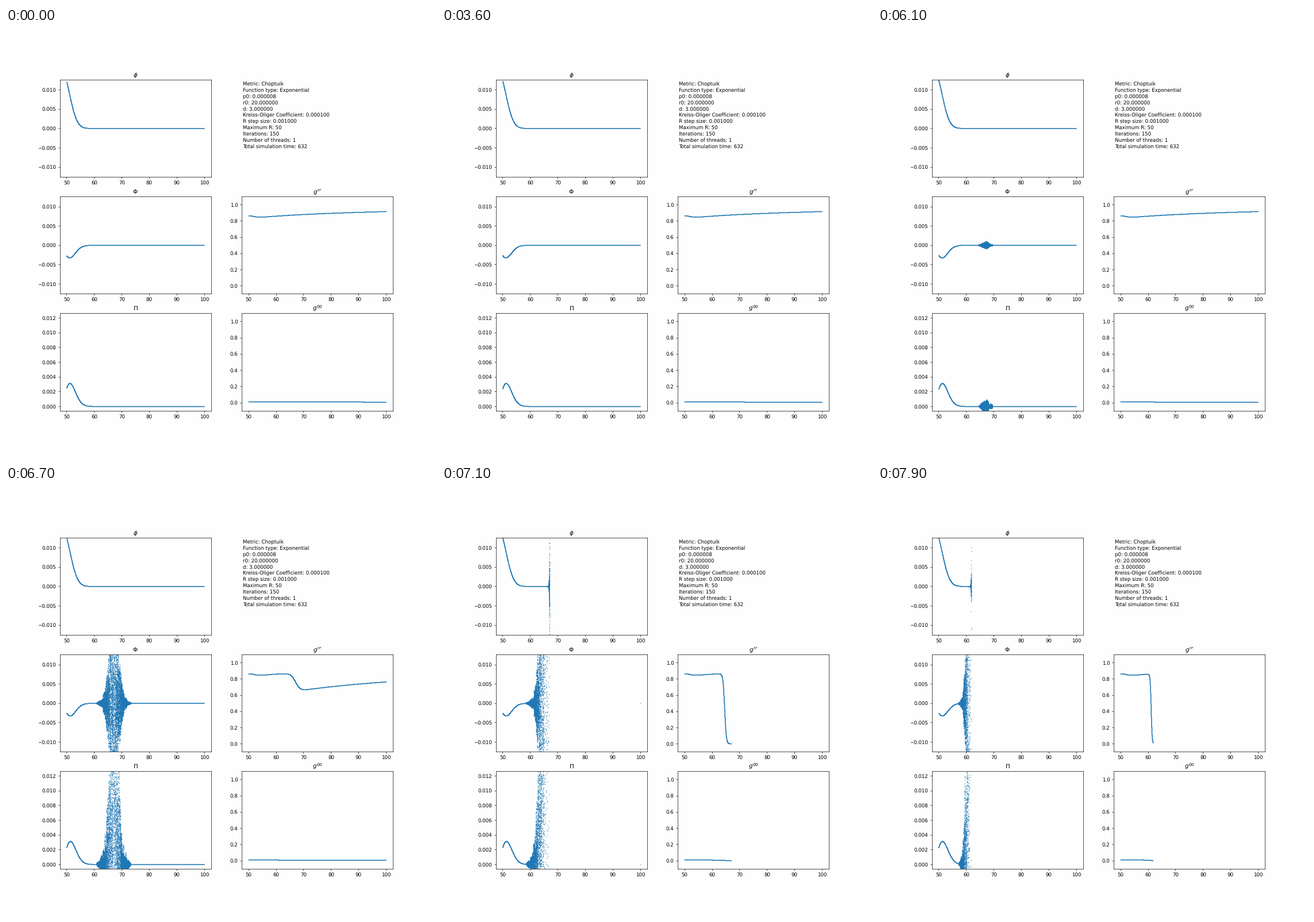
Write a matplotlib script that moves like this. It is 748 px wide and 748 px high and loops after 8 s.

```python
import numpy as np
import matplotlib.pyplot as plt
from matplotlib.animation import FuncAnimation

SIZE, INCHES = 748, 12
FRAMES, STEP = 80, 100
GRID = 1200 / SIZE          # curve points sit on a finer pixel grid
COLLAPSE = 6.95             # seconds
BLUE, PAPER = "C0", "#fefefe"

INFO = """Metric: Choptuik
Function type: Exponential
p0: 0.000008
r0: 20.000000
d: 3.000000
Kreiss-Oliger Coefficient: 0.000100
R step size: 0.001000
Maximum R: 50
Iterations: 150
Number of threads: 1
Total simulation time: 632"""

plt.rcParams["font.family"] = "DejaVu Sans"
plt.rcParams["text.hinting"] = "none"
plt.rcParams["axes.facecolor"] = PAPER
fig = plt.figure(figsize=(INCHES, INCHES), dpi=SIZE / INCHES, facecolor=PAPER)

r = np.linspace(50, 100, 4001)
fine = np.arange(56, 78, 0.001)


class Panel:
    def __init__(self, slot, title, ylim, yticks):
        self.ax = ax = fig.add_subplot(3, 2, slot)
        ax.set_title(title)
        ax.set_xlim(47.5, 102.5)
        ax.set_ylim(*ylim)
        ax.set_xticks(range(50, 101, 10))
        ax.set_yticks(yticks)
        self.ylim = ylim
        self.line, = ax.plot([], [], color=BLUE, lw=1.85, snap=False,
                             solid_capstyle="butt", solid_joinstyle="round")
        self.dots = ax.scatter([], [], s=2.25, color=BLUE, edgecolors="none")

    def snap(self, x, y):
        """Move points to the centres of the fine pixel grid."""
        to_px = self.ax.transData
        px = to_px.transform(np.column_stack([x, y])) * GRID
        px = np.round(px) + (0.5, -0.5)
        return to_px.inverted().transform(px / GRID)

    def curve(self, y, show):
        pts = self.snap(r, y)
        pts[~show] = np.nan
        self.line.set_data(pts[:, 0], pts[:, 1])

    def cloud(self, x, y):
        ok = (y > self.ylim[0]) & (y < self.ylim[1])
        self.dots.set_offsets(self.snap(x[ok], y[ok]))


small = np.arange(-0.010, 0.011, 0.005)
unit = np.arange(0, 1.1, 0.2)
phi = Panel(1, r"$\phi$", (-0.0126, 0.0126), small)
grad = Panel(3, r"$\Phi$", (-0.0126, 0.0126), small)
mom = Panel(5, r"$\Pi$", (-0.0006, 0.0126), np.arange(0, 0.0121, 0.002))
grr = Panel(4, r"$g^{rr}$", (-0.1, 1.1), unit)
g00 = Panel(6, r"$g^{00}$", (-0.1, 1.1), unit)

for i, row in enumerate(INFO.split("\n")):
    fig.text(412.3 / SIZE, 1 - (100.6 + 10.8 * i) / SIZE, row, fontsize=10)


def pulse(x, t):
    return 0.01444 * np.exp(-((x - 48.366 - 0.025 * t) / 3.8) ** 2)


def bump(x, t, peak, centre, width):
    u = (x - centre - 0.025 * t) / width
    return peak * u * np.exp(-u * u) / 0.4289


def grad_wave(x, t):
    return bump(x, t, -0.00328, 48.366, 3.8)


def mom_wave(x, t):
    return bump(x, t, 0.00312, 48.5, 3.75)


def envelope(x, t):
    """Height of the numerical noise."""
    if t < COLLAPSE:
        shape = np.exp(-0.5 * np.abs(x - 67.1) ** 1.3)
        return 0.03 * np.exp(6.2 * (t - 6.7)) * shape
    late = t - 7.1
    grow = (x - 63 + 4.1 * late) * (1.01 + late)
    return 0.0126 * np.exp(np.minimum(grow, 8))


def front(t):
    return 67.1 - 6.5 * (t - 7.1) if t > COLLAPSE else 101


def noise(rng, n, block=120):
    swell = np.repeat(rng.uniform(0.3, 1.5, n // block + 1), block)[:n]
    return swell * rng.uniform(-1, 1, n)


def metric(t):
    mass = 8.45 - 1.65 * np.exp(-((r - 50) / 2.6) ** 1.8)
    if t > COLLAPSE:
        late = t - 7.1
        fall = 0.5 - 0.5 * np.tanh((r - 64.55 + 4.3 * late) / (0.6 - 0.3 * late))
        return (1 - mass / r) * fall, fall
    gain = 57 * (1 - np.exp(-17.7 * np.exp(11 * (t - 6.7)) / 57))
    d = r - 67.1
    step = 0.5 + 0.5 * np.tanh(d / 1.7)
    step += 0.015 * np.sin(7 * d) * np.exp(-(d / 2) ** 2)
    return 1 - (mass + gain * step) / r, np.ones_like(r)


def draw(k):
    t = k * STEP / 1000
    rng = np.random.default_rng(100 + k)
    end = front(t)
    alive = r <= end

    phi.curve(pulse(r, t), alive)
    x = fine[(fine > end - 1) & (fine <= end)]
    burst = 0.03 * np.exp(11 * (x - end) - 1.5 * (t - 7.1))
    phi.cloud(x, pulse(x, t) + burst * noise(rng, x.size, 10))

    env = envelope(fine, t)
    rough = (env > 0.00015) & (fine <= end)
    x, env = fine[rough], env[rough]
    calm = alive & (envelope(r, t) < 0.0015)
    for panel, wave in ((grad, grad_wave), (mom, mom_wave)):
        panel.curve(wave(r, t), calm)
        px, py = x, wave(x, t) + env * noise(rng, x.size)
        if COLLAPSE < t < 7.25:
            px, py = np.append(px, 100), np.append(py, 0)
        panel.cloud(px, py)

    g, fall = metric(t)
    grr.curve(g, alive)
    edge = 91.2 - 6.7 * t + 0.315 * t * t
    g00.curve((0.0082 + 4e-5 * (edge - r)) * fall, alive)
    return [a for p in (phi, grad, mom, grr, g00) for a in (p.line, p.dots)]


anim = FuncAnimation(fig, draw, frames=FRAMES, interval=STEP,
                     init_func=lambda: draw(0), repeat=True, repeat_delay=0)
plt.show()
```
